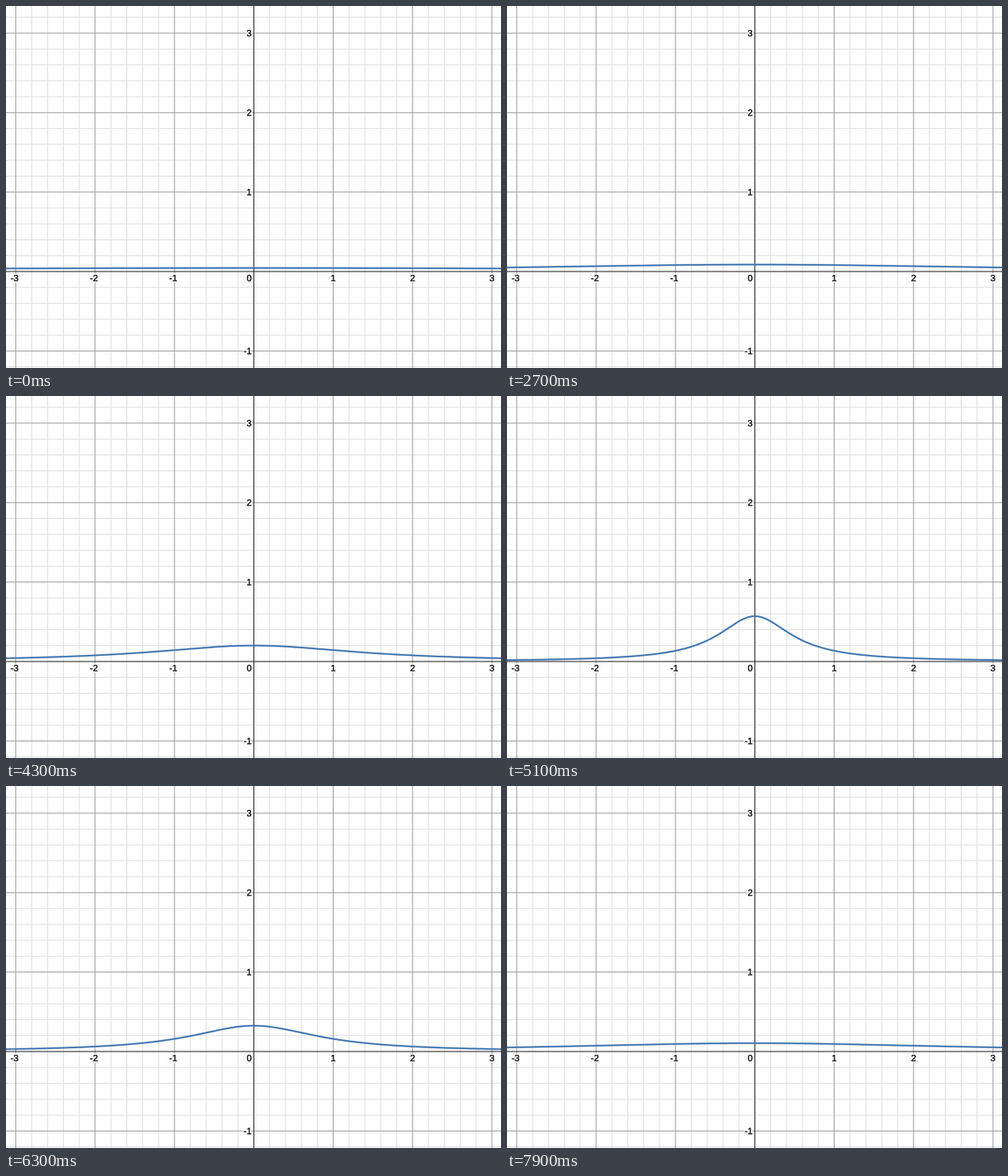
A matplotlib script for the animation above (8000 ms loop, 600 by 439 pixels).

```python
import numpy as np
import matplotlib.pyplot as plt
from matplotlib.animation import FuncAnimation
from matplotlib.patheffects import Stroke

W, H, DPI = 600, 439, 64
PX = 72 / DPI                  # one pixel in points
X0, Y0 = 300.4, 322.0          # graph origin in pixels
UX, UY = 96.2, 96.35           # pixels per graph unit
FRAMES, STEP = 80, 100
SPEED, T_SPIKE = 1.28, 5.5355  # width change per second, time of zero width
PAPER, BLUE = "#fefefe", "#356fad"

fig = plt.figure(figsize=(W / DPI, H / DPI), dpi=DPI, facecolor=PAPER)
ax = fig.add_axes([0, 0, 1, 1])
ax.set_xlim(0, W)
ax.set_ylim(H, 0)
ax.axis("off")


def rule(xs, ys, color, z):
    ax.plot(xs, ys, color=color, lw=PX, snap=False, zorder=z,
            solid_capstyle="butt")


def label(x, y, text, ha):
    ax.text(x, y, text, ha=ha, va="baseline", family="Liberation Sans",
            fontsize=11 * PX, color="black", zorder=5,
            path_effects=[Stroke(linewidth=3 * PX, foreground=PAPER),
                          Stroke(linewidth=0.3 * PX, foreground="black")])


for k in range(-16, 18):
    if k == 0:
        color, z = "#1c1c1c", 3
    elif k % 5 == 0:
        color, z = "#9c9c9c", 2
    else:
        color, z = "#dfe0e1", 1
    gx, gy = X0 + k * UX / 5, Y0 - k * UY / 5
    rule([gx, gx], [0, H], color, z)
    rule([0, W], [gy, gy], color, z)

for n in (-3, -2, -1, 1, 2, 3):
    label(X0 + n * UX - (1.5 if n < 0 else 0), 333.7, str(n), "center")
for n in (-1, 1, 2, 3):
    label(297.7, Y0 - n * UY + 3.8, str(n), "right")
label(297.8, 333.7, "0", "right")

px = np.linspace(-2, W + 2, 2417)
x = (px - X0) / UX

# a solid core inside a faint wider stroke gives the soft edge
strokes = [ax.plot([], [], color=BLUE, lw=lw * PX, alpha=alpha, zorder=6,
                   solid_joinstyle="round")[0]
           for lw, alpha in ((2.6, 0.3), (1.6, 1))]


def draw(i):
    a = SPEED * abs(i * STEP / 1000 - T_SPIKE)
    y = a / (np.pi * (x**2 + a**2))
    for line in strokes:
        line.set_data(px, Y0 - UY * y)
    return strokes


anim = FuncAnimation(fig, draw, frames=FRAMES, interval=STEP,
                     repeat=True, repeat_delay=0, blit=False)
plt.show()
```
